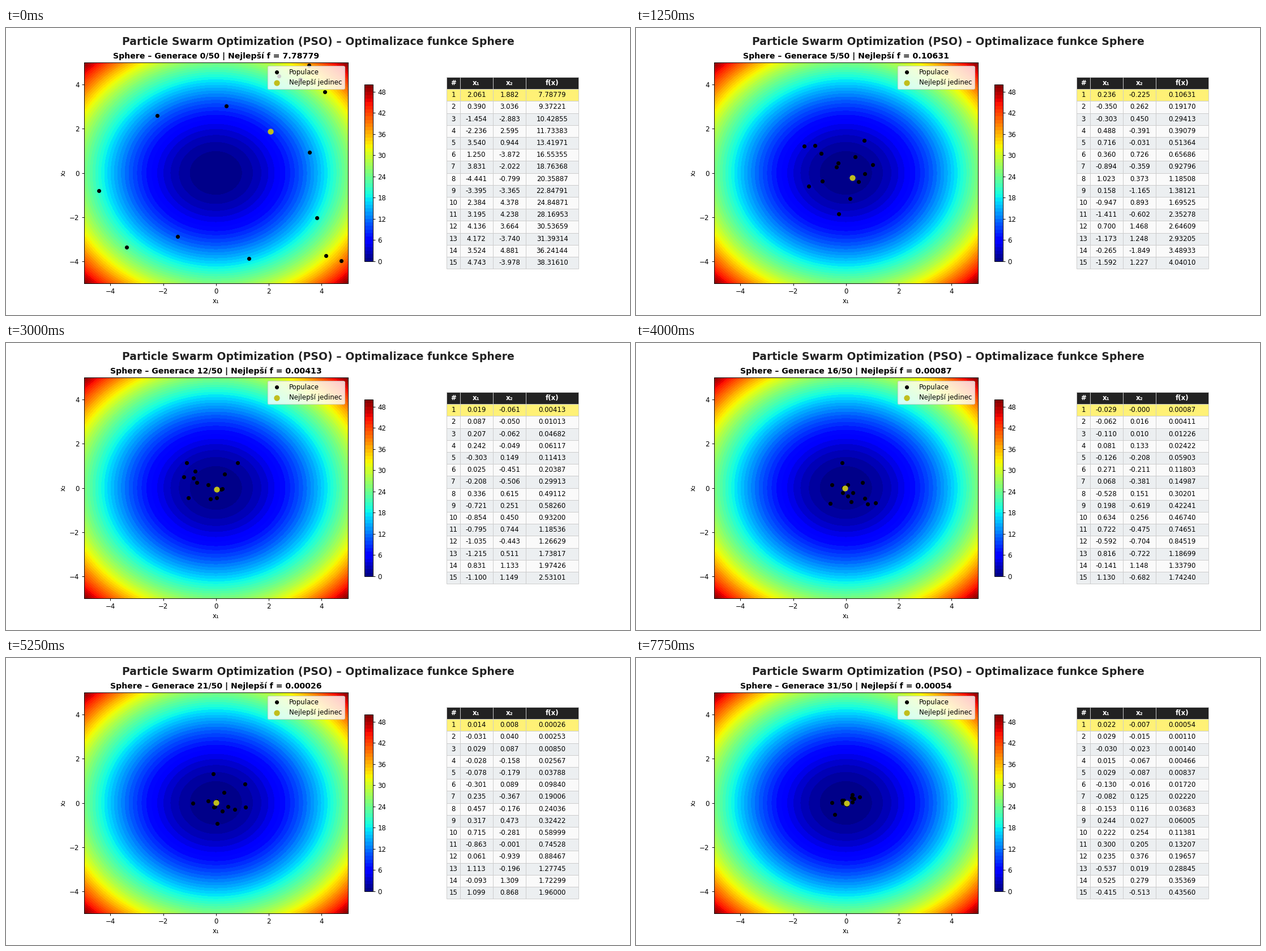
Recreate the animation shown at these times as a matplotlib script. Size 1102x508 px, loop 8 s.

```python
import numpy as np
import matplotlib.pyplot as plt
from matplotlib.animation import FuncAnimation

DPI = 1102 / 13
GENERATIONS, TOTAL, COUNT = 32, 50, 15
HEADER = ["#", "x₁", "x₂", "f(x)"]
plt.rcParams["font.family"] = "DejaVu Sans"

# Key points of the run: generation, best x1, best x2, distance of the worst particle.
KEYS = np.array([
    [0, 2.06055, 1.882, 6.19],
    [5, 0.23598, -0.225, 2.01],
    [9, 0.11421, 0.015, 1.83],
    [16, -0.02949, -0.0001, 1.32],
    [21, 0.014, 0.008, 1.40],
    [26, 0.002, 0.0102, 1.47],
    [31, 0.0222, -0.007, 0.66],
])
KEY_GEN, KEY_X, KEY_Y, KEY_OUTER = KEYS.T


def sphere(x, y):
    return x ** 2 + y ** 2


def at_generation(gen, values):
    return np.interp(gen, KEY_GEN, values)


def random_direction(rng, radius):
    """Angle that keeps a particle at this radius inside the search square."""
    while True:
        angle = rng.uniform(-np.pi, np.pi)
        if radius * max(abs(np.cos(angle)), abs(np.sin(angle))) < 5:
            return angle


def population(gen):
    """Best particle on its path, the others scattered from it to the outer radius."""
    rng = np.random.default_rng(gen)
    inner = np.exp(at_generation(gen, np.log(np.hypot(KEY_X, KEY_Y))))
    outer = np.exp(at_generation(gen, np.log(KEY_OUTER)))
    rank = np.linspace(0, 1, COUNT)
    rank[1:-1] = np.sort(rank[1:-1] + rng.uniform(-0.03, 0.03, COUNT - 2))
    radius = inner + (outer - inner) * rank ** (1 + gen / 40)
    angle = np.array([random_direction(rng, r) for r in radius])
    angle[0] = at_generation(gen, np.arctan2(KEY_Y, KEY_X))
    return radius * np.cos(angle), radius * np.sin(angle)


# The tiny margin keeps the pixel size from rounding down.
fig = plt.figure(figsize=(13 + 1e-9, 508 / DPI + 1e-9), dpi=DPI, facecolor="white")
fig.suptitle("Particle Swarm Optimization (PSO) – Optimalizace funkce Sphere",
             fontsize=16, fontweight="bold", color="#222222", y=0.97)
grid = fig.add_gridspec(1, 2, width_ratios=[3, 1])
ax = fig.add_subplot(grid[0])
table_ax = fig.add_subplot(grid[1])
table_ax.axis("off")

axis = np.linspace(-5, 5, 200)
X, Y = np.meshgrid(axis, axis)
contours = ax.contourf(X, Y, sphere(X, Y), levels=50, cmap="jet")
fig.colorbar(contours, ax=ax, shrink=0.8)
particles = ax.scatter([], [], s=25, color="black", label="Populace", zorder=3)
best = ax.scatter([], [], s=60, color="#c0be1e", label="Nejlepší jedinec", zorder=4)
ax.set(xlim=(-5, 5), ylim=(-5, 5))
ax.set_xlabel("x₁", labelpad=3)
ax.set_ylabel("x₂")
title = ax.set_title("", fontsize=12, fontweight="bold")
ax.legend(loc="upper right")

table = table_ax.table(cellText=[[""] * len(HEADER)] * COUNT, colLabels=HEADER,
                       colWidths=[0.1, 0.25, 0.25, 0.4], cellLoc="center", loc="center")
table.auto_set_font_size(False)
table.set_fontsize(10)
table.scale(1.2, 1.5)
for (row, _), cell in table.get_celld().items():
    cell.set_edgecolor("#cccccc")
    cell.set_linewidth(0.8)
    if row == 0:
        cell.set_facecolor("#222222")
        cell.set_text_props(color="white", fontweight="bold")
    elif row == 1:
        cell.set_facecolor("#fff176")
    else:
        cell.set_facecolor("#eceff1" if row % 2 else "#fafafa")


def draw(gen):
    x, y = population(gen)
    f = sphere(x, y)
    particles.set_offsets(np.column_stack([x, y]))
    best.set_offsets([[x[0], y[0]]])
    title.set_text(f"Sphere – Generace {gen}/{TOTAL} | Nejlepší f = {f[0]:.5f}")
    for i in range(COUNT):
        values = (str(i + 1), f"{x[i]:.3f}", f"{y[i]:.3f}", f"{f[i]:.5f}")
        for col, text in enumerate(values):
            table[i + 1, col].get_text().set_text(text)
    return particles, best, title


anim = FuncAnimation(fig, draw, frames=GENERATIONS, interval=250, repeat=True,
                     repeat_delay=0, blit=False)
plt.show()
```
